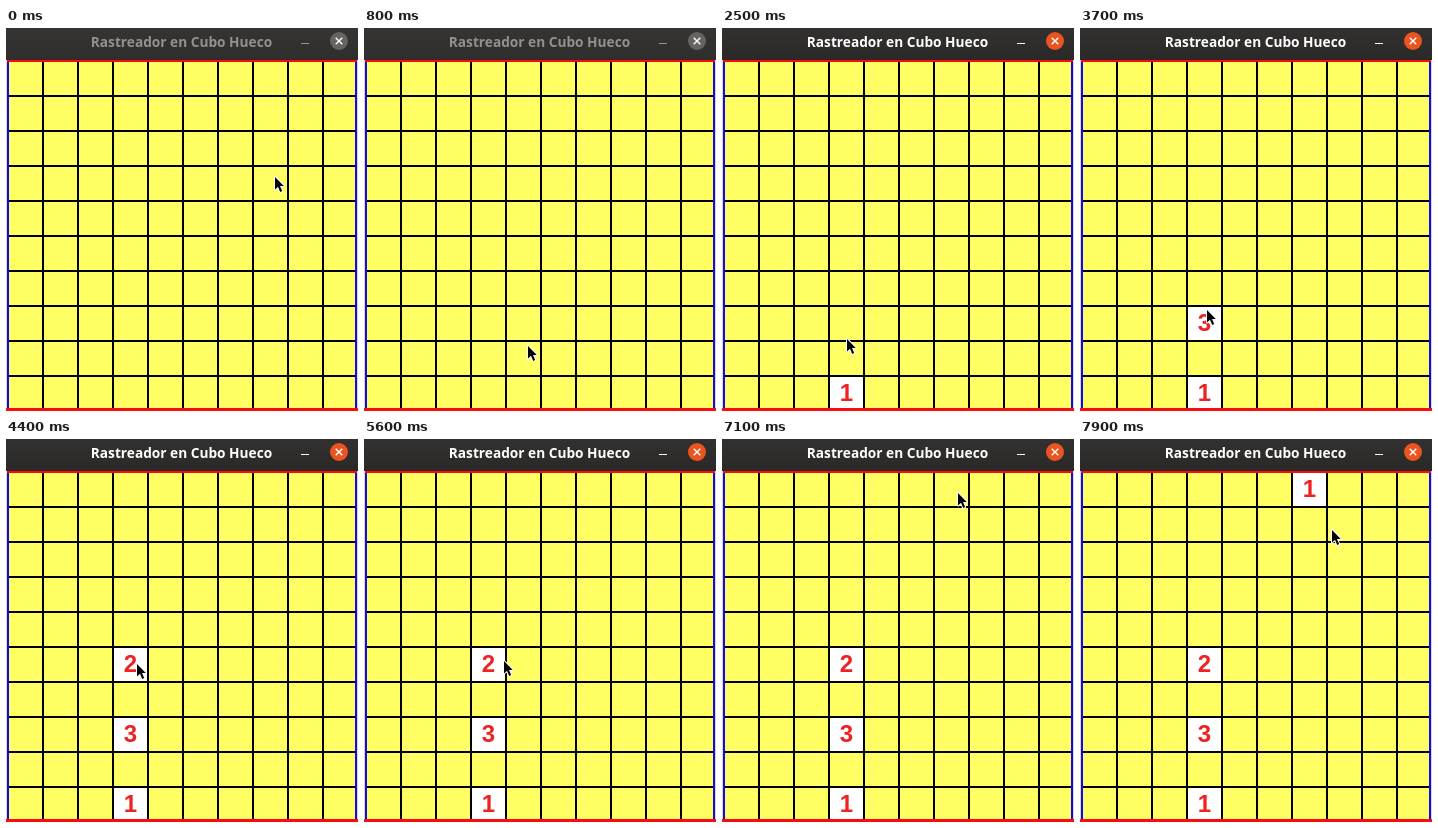
Animation of 352x383 px, one loop 8000 ms. Source, as an HTML page with a canvas:

```html
<!DOCTYPE html>
<html lang="es">
<head>
<meta charset="utf-8">
<style>
  html, body { margin: 0; width: 100%; height: 100%; overflow: hidden; }
  canvas { display: block; }
</style>
</head>
<body>
<canvas id="stage" width="352" height="383"></canvas>
<script>
const ctx = document.getElementById('stage').getContext('2d');
const LOOP = 8000, TICK = 100, CELL = 35, LEFT = 2, TOP = 33;
const FOCUS_AT = 1400;
const RED = '#f80c10', BLUE = '#1408e8';

const reveals = [
  { at: 1500, col: 3, row: 9, digit: 1 },
  { at: 3000, col: 3, row: 7, digit: 3 },
  { at: 4400, col: 3, row: 5, digit: 2 },
  { at: 7200, col: 6, row: 0, digit: 1 }
];

// Pointer strokes: start time, end time, destination
const origin = [268, 148];
const strokes = [
  [200, 400, 299, 159],
  [500, 600, 315, 172],
  [600, 900, 136, 342],
  [1000, 1200, 128, 358],
  [2000, 2300, 124, 313],
  [2400, 2700, 125, 291],
  [3600, 3800, 126, 271],
  [3900, 4200, 130, 224],
  [5500, 5600, 139, 221],
  [5600, 5700, 199, 174],
  [5800, 6200, 261, 67],
  [6300, 6600, 252, 56],
  [6600, 7100, 235, 53],
  [7600, 7900, 251, 90]
];

const clamp = v => Math.min(1, Math.max(0, v));
const easeInOut = p => p < 0.5 ? 4 * p ** 3 : 1 - 4 * (1 - p) ** 3;

function pointerAt(t) {
  const now = Math.floor(t / TICK) * TICK;
  return strokes.reduce(([x, y], [start, end, toX, toY]) => {
    const k = easeInOut(clamp((now - start) / (end - start)));
    return [x + (toX - x) * k, y + (toY - y) * k];
  }, origin).map(Math.round);
}

function rect(color, x, y, w, h) {
  ctx.fillStyle = color;
  ctx.fillRect(x, y, w, h);
}

function text(str, x, y, font, color) {
  ctx.font = font;
  ctx.fillStyle = color;
  ctx.textAlign = 'center';
  ctx.fillText(str, x, y);
}

function drawTitleBar(focused) {
  const ink = focused ? '#ffffff' : '#929190';
  const shade = ctx.createLinearGradient(0, 0, 0, 32);
  shade.addColorStop(0, focused ? '#323130' : '#353433');
  shade.addColorStop(1, focused ? '#2a2928' : '#2f2e2d');
  rect(shade, 0, 0, 352, 32);
  text('Rastreador en Cubo Hueco', 175.5, 19,
    'bold 13.7px "Open Sans", "Noto Sans", sans-serif', ink);
  rect(ink, 295, 15, 8, 1);

  ctx.fillStyle = focused ? '#e95420' : '#656463';
  ctx.beginPath();
  ctx.arc(333, 13, 9, 0, Math.PI * 2);
  ctx.fill();
  ctx.strokeStyle = '#fff';
  ctx.lineWidth = 1.4;
  ctx.stroke(new Path2D('M329.7 9.7l6.6 6.6m0-6.6l-6.6 6.6'));
}

function drawBoard(t) {
  rect('#d9d9d9', 0, 32, 352, 351);
  rect('#ffff64', 1, 32, 350, 350);
  for (const { at, col, row, digit } of reveals) {
    if (t < at) continue;
    const x = LEFT + col * CELL, y = TOP + row * CELL;
    rect('#fff', x, y, CELL, CELL);
    text(digit, x + 17.5, y + 25, 'bold 24px "Liberation Sans", sans-serif', '#ee2222');
  }
  for (let i = 1; i < 10; i++) {
    rect('#000', LEFT + i * CELL - 1, 32, 2, 350);
    rect('#000', 1, TOP + i * CELL - 1, 350, 2);
  }
  rect(BLUE, 1, 32, 2, 350);
  rect(BLUE, 349, 32, 2, 350);
  rect(RED, 1, 32, 350, 2);
  rect(RED, 0, 380, 352, 3);
}

const arrow = new Path2D('M1 1V13.5L4 10.8L6.2 16L8.2 15.1L6 10H9.8Z');

function drawPointer(x, y) {
  ctx.save();
  ctx.translate(x, y);
  ctx.lineJoin = 'round';
  ctx.lineWidth = 2;
  ctx.strokeStyle = '#fff';
  ctx.stroke(arrow);
  ctx.fillStyle = '#000';
  ctx.fill(arrow);
  ctx.restore();
}

function frame() {
  const t = performance.now() % LOOP;
  drawTitleBar(t >= FOCUS_AT);
  drawBoard(t);
  drawPointer(...pointerAt(t));
  requestAnimationFrame(frame);
}
frame();
</script>
</body>
</html>
```
